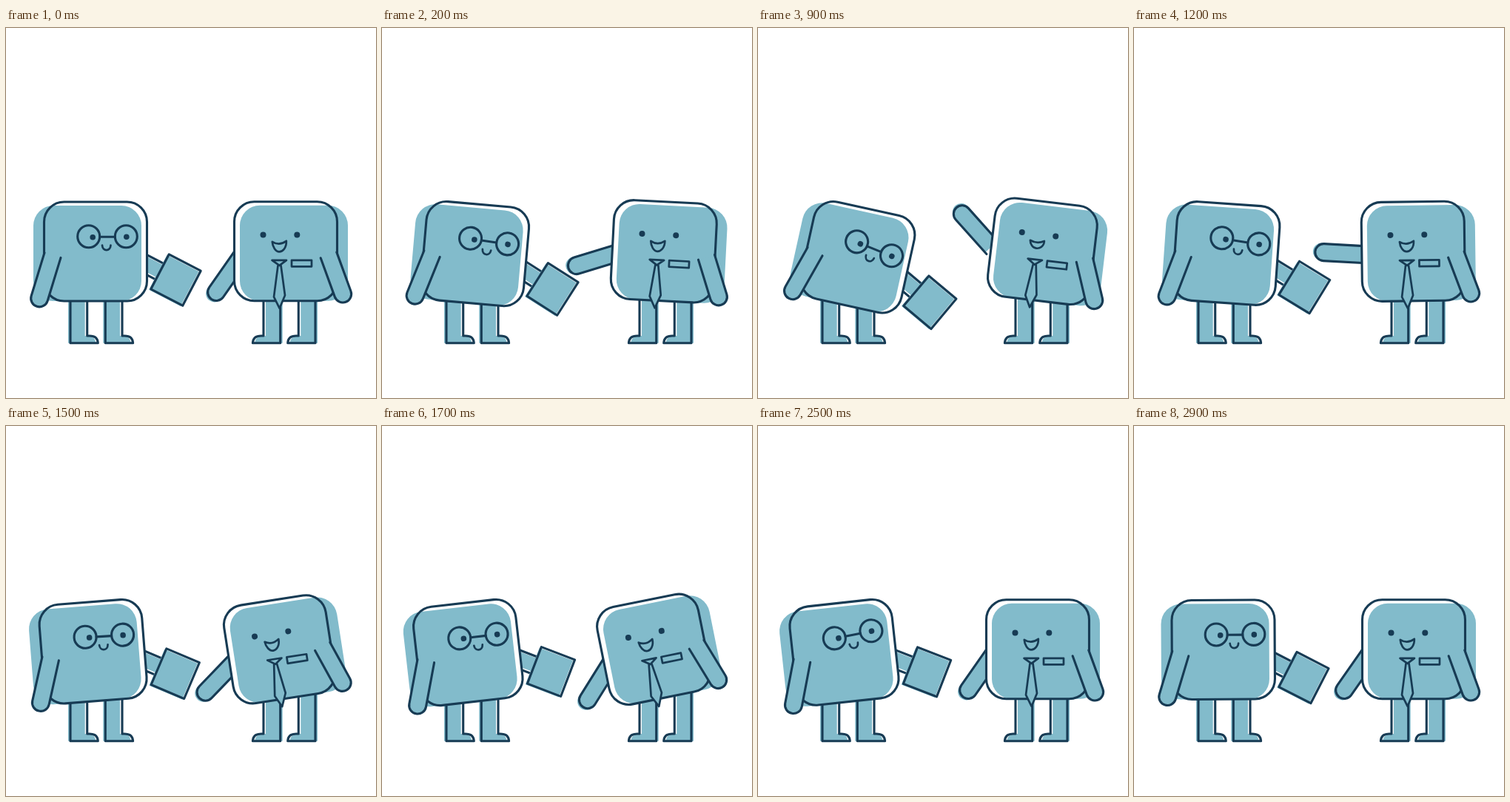
Recreate the animation shown at these times as an HTML page. Size 500x500 px, loop 3000 ms.

```html
<!DOCTYPE html>
<html lang="en">
<head>
<meta charset="utf-8">
<title>Two block friends</title>
<style>
  html, body { margin: 0; width: 100%; height: 100%; overflow: hidden; background: #fff; }
  svg { display: block; width: 100vw; height: 100vh; }
  .line { fill: none; stroke: #173b54; stroke-width: 3.1; stroke-linejoin: round; stroke-linecap: round; }
  .white { fill: #fff; }
  .blue { fill: #82bbcb; }
  .dark { fill: #173b54; }
  .thin { stroke-width: 2.7; }
</style>
</head>
<body>
<svg viewBox="0 0 500 500">
  <defs>
    <path id="leg" d="M87 345V425.8H124.3C124 419.5 120 416 113 416H109.7V345"/>
    <g id="legShape">
      <use href="#leg" class="white"/>
      <use href="#leg" class="blue" x="-3"/>
      <use href="#leg" class="line"/>
    </g>
    <g id="legs">
      <use href="#legShape"/>
      <use href="#legShape" x="47.3"/>
    </g>
    <rect id="box" x="-69.5" y="-67" width="139" height="134" rx="27"/>
    <g id="torso">
      <use href="#box" class="white"/>
      <rect class="blue" x="-84" y="-62" width="146" height="129" rx="27"/>
      <use href="#box" class="line"/>
    </g>
    <rect id="sheet" x="-24.2" y="-26.5" width="48.4" height="53"/>
  </defs>

  <use href="#legs"/>
  <g id="left">
    <g transform="translate(108.5 38.5) rotate(27.5)">
      <rect class="blue" x="-60" y="-10" width="50" height="19"/>
      <path class="line" d="M-60 -12H-10M-60 12H-10"/>
      <use href="#sheet" class="white"/>
      <use href="#sheet" class="blue" x="-2" y="2"/>
      <use href="#sheet" class="line"/>
    </g>
    <use href="#torso"/>
    <g transform="translate(-58 5) rotate(17)">
      <path class="limb blue"/>
      <path class="limb line"/>
    </g>
    <g id="face">
      <circle class="line" cx="-25.3" r="15"/>
      <circle class="line" cx="25.3" r="15"/>
      <path class="line" d="M-10.3 0.5H10.3"/>
      <circle class="dark" cx="-19.8" cy="1" r="3.8"/>
      <circle class="dark" cx="25.8" cy="0.5" r="3.8"/>
      <path class="line thin" d="M-7 12C-6.5 20.5 4 20.5 4.5 12"/>
    </g>
  </g>

  <use href="#legs" transform="translate(505 0) scale(-1 1)"/>
  <g id="wave">
    <path class="limb blue" transform="translate(-1 3)"/>
    <path class="limb line"/>
  </g>
  <g id="right">
    <g transform="scale(-1 1)">
      <use href="#torso"/>
      <g transform="translate(-58 5) rotate(20)">
        <path class="limb blue"/>
        <path class="limb line"/>
      </g>
    </g>
    <circle class="dark" cx="-30.5" cy="-22.3" r="4"/>
    <circle class="dark" cx="15.3" cy="-22.3" r="4"/>
    <path id="mouth" class="line thin"/>
    <path class="blue" d="M-11 19L-16 61.5L-8.3 77L-1 59.5L-6 19Z"/>
    <path class="line thin" d="M-10.5 19L-16 61.5L-8.3 77L-1 59.5L-6.5 19M-18.5 12H1L-8.5 19Z"/>
    <rect class="line thin" x="8" y="12" width="27" height="8.5"/>
  </g>
</svg>
<script>
const LOOP = 3000, STEP = 100, RAD = Math.PI / 180;
const el = id => document.getElementById(id);
const place = (id, x, y, a) =>
  el(id).setAttribute('transform', `translate(${x} ${y}) rotate(${a})`);

// Angles in degrees as [time, value], eased between the poses
const lean = [[0, 0], [500, 14.5], [700, 14.5], [1700, -6.5], [2100, -9], [2200, -9], [LOOP, 0]];
const nod = [[0, 0], [500, 10.5], [700, 10.5], [1700, 0], [2100, -9], [LOOP, 0]];
const turn = [[0, 0], [500, 8.5], [700, 8.5], [1750, -11.5], [2150, -11.5], [2500, 0], [LOOP, 0]];
const wave = [[0, 35], [500, 145], [750, 145], [1700, 32], [2100, 19.5], [2500, 35], [LOOP, 35]];

function ease(keys, t) {
  const i = keys.findIndex(k => k[0] > t);
  const [t0, a] = keys[i - 1], [t1, b] = keys[i];
  return a + (b - a) * (1 - Math.cos(Math.PI * (t - t0) / (t1 - t0))) / 2;
}

function drawLeft(t) {
  const a = ease(lean, t), n = ease(nod, t);
  place('left', 121 + 0.85 * a + 0.02 * a * a, 302 + 0.62 * Math.abs(a), a);
  place('face', 16 + 0.35 * n, -20.3 + 0.45 * n, n);
}

function drawRight(t) {
  const a = ease(turn, t), w = ease(wave, t);
  const x = 378 + 0.95 * a, y = 301.8;
  place('right', x, y, a);

  // A raised arm slides out at the shoulder and the mouth closes a little
  const up = Math.max(0, -Math.cos(w * RAD));
  const sx = -58 - 12 * up, sy = 4;
  const c = Math.cos(a * RAD), s = Math.sin(a * RAD);
  place('wave', x + sx * c - sy * s, y + sx * s + sy * c, w);

  const m = k => k * (1 - 0.36 * up) - 13;
  el('mouth').setAttribute('d', `M-18.2 -13Q-8.7 ${m(6)} 0.8 -14
    C1.3 ${m(9)} -4.7 ${m(13.5)} -8.7 ${m(13.5)}C-13.7 ${m(13.5)} -17.7 ${m(7)} -18.2 -13Z`);
}

// Arm lengths: left figure, waving arm, resting arm
const lengths = [61, 62.5, 56];
document.querySelectorAll('.limb').forEach((p, i) => {
  const len = lengths[i >> 1];
  p.setAttribute('d', `M-11.5 0V${len}A11.5 11.5 0 0 0 11.5 ${len}V0`);
});

function tick() {
  const t = Math.floor(performance.now() % LOOP / STEP) * STEP;
  drawLeft(t);
  drawRight(t);
  requestAnimationFrame(tick);
}
tick();
</script>
</body>
</html>
```
